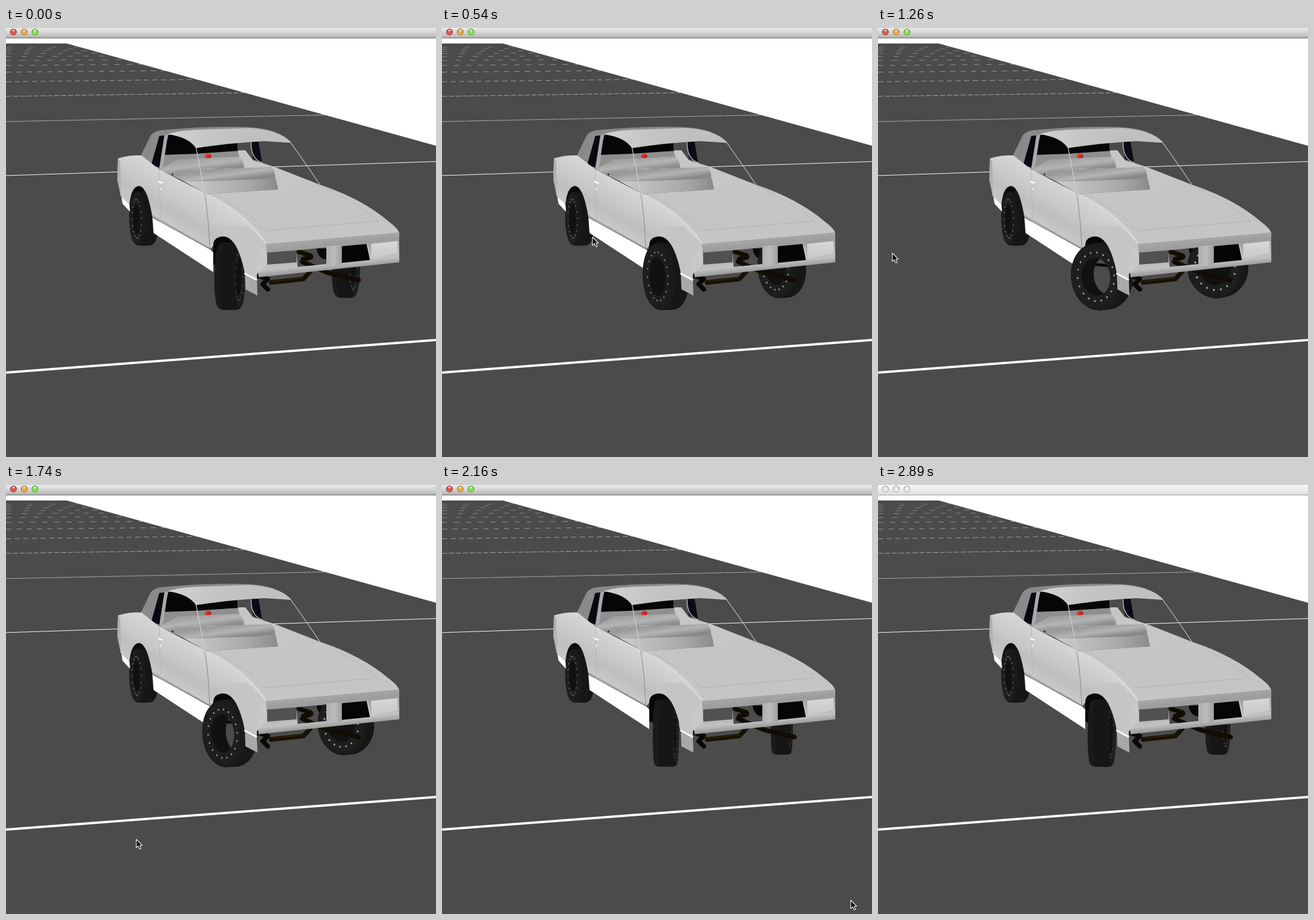
An HTML page with a canvas that plays this animation: 749 px wide and 747 px high, repeating every 2930 ms.

```html
<!DOCTYPE html>
<html lang="en">
<head>
<meta charset="utf-8">
<title>Steering</title>
<style>
html, body { margin: 0; width: 100%; height: 100%; overflow: hidden; background: #fff; }
canvas { display: block; width: 100vw; height: 100vh; }
</style>
</head>
<body>
<canvas id="stage" width="749" height="747"></canvas>
<script>
const ctx = document.getElementById('stage').getContext('2d');
const LOOP = 2930, STEP = 60, BLUR = 2890;
const ENTER = 3, LEAVE = 43;
const GROUND = '#4b4b4b';

// pointer stops: step, x, y
const stops = [
  [ENTER, 714, 336], [9, 262, 364], [11, 173, 368], [16, 25, 392], [21, 25, 392], [23, 0, 420],
  [29, 227, 617], [33, 560, 691], [36, 712, 723], [40, 712, 723], [LEAVE, 715, 750]
];

const rate = (i, c) => (stops[i + 1][c] - stops[i][c]) / (stops[i + 1][0] - stops[i][0]);

// Slope that never overshoots a stop
function slope(i, c) {
  if (i === 0) return rate(0, c);
  if (i === stops.length - 1) return rate(i - 1, c);
  const a = rate(i - 1, c), b = rate(i, c);
  return a * b <= 0 ? 0 : 2 * a * b / (a + b);
}

function pointerAt(step, c) {
  const s = Math.min(Math.max(step, ENTER), LEAVE);
  let i = 0;
  while (s > stops[i + 1][0]) i++;
  const d = stops[i + 1][0] - stops[i][0], k = (s - stops[i][0]) / d, m = 1 - k;
  return m * m * (1 + 2 * k) * stops[i][c] + k * k * (3 - 2 * k) * stops[i + 1][c]
    + d * k * m * (m * slope(i, c) - k * slope(i + 1, c));
}

// The wheels follow the pointer one step late
function steerAt(step) {
  const x = step > ENTER ? pointerAt(step - 1, 1) : 749;
  return 49 - 0.08 * (x - 25);
}

function shape(fill, d) {
  ctx.fillStyle = fill;
  ctx.fill(new Path2D(d), 'evenodd');
}
function line(color, width, d, dash = []) {
  ctx.setLineDash(dash);
  ctx.strokeStyle = color;
  ctx.lineWidth = width;
  ctx.stroke(new Path2D(d));
  ctx.setLineDash([]);
}
function grad(x0, y0, x1, y1, ...colors) {
  const g = ctx.createLinearGradient(x0, y0, x1, y1);
  colors.forEach((c, i) => g.addColorStop(i / (colors.length - 1), c));
  return g;
}
function oval(fill, x, y, rx, ry = rx) {
  ctx.beginPath();
  ctx.ellipse(x, y, rx, ry, 0, 0, 7);
  ctx.fillStyle = fill;
  ctx.fill();
}

function titleBar(active) {
  ctx.fillStyle = active ? grad(0, 0, 0, 17, '#ececec', '#d2d2d2', '#b2b2b2')
                         : grad(0, 0, 0, 17, '#f8f8f8', '#ececec', '#dedede');
  ctx.fillRect(0, 0, 749, 17);
  ctx.fillStyle = active ? '#686868' : '#9a9a9a';
  ctx.fillRect(0, 17, 749, 1);
  [4, 38, 100].forEach((hue, i) => {
    const x = 13 + i * 18.75;
    oval(active ? `hsl(${hue},55%,38%)` : '#9c9c9c', x, 7, 5.8);
    oval(active ? `hsl(${hue},75%,60%)` : '#ececec', x, 7.3, 4.7);
    if (active) oval('rgba(255,255,255,.65)', x, 4.2, 2.6, 1.5);
  });
}

// Evenly spaced floor lines that meet in one far point
function floor() {
  ctx.fillStyle = '#fff';
  ctx.fillRect(0, 18, 749, 729);
  shape(GROUND, 'M0 27 H106 L749 205 V747 H0Z');
  const farX = 7930, farY = -2;
  for (let i = 0; i < 13; i++) {
    const h = 1 / (0.001661 + 0.0022 * i), m = h / farX;
    const x = Math.min(749, (farY + h + 2.3) / (0.2768 + m));
    const dash = i < 2 ? [] : i < 3 ? [40, 1] : [9, 3 + 3 * (i - 3)];
    line(`rgba(255,255,255,${i < 2 ? 1 : 0.6 - 0.03 * i})`, Math.max(1, 4 * (h / 602) ** 1.5),
      `M0 ${farY + h} L${x} ${farY + h - m * x}`, dash);
  }
}

// A tyre built from discs along its axle; deg turns its face towards the viewer
function wheel(cx, cy, R, W, deg, open) {
  const a = deg * Math.PI / 180, s = Math.sin(a), c = Math.cos(a), tilt = .1;
  const side = s >= 0 ? 1 : -1, rim = .85 * side;
  const spot = (w, r, q) => [
    cx - W * w * c + Math.cos(q) * s * r,
    cy + W * w * s * tilt + Math.cos(q) * c * tilt * r - Math.sin(q) * r
  ];
  const ring = (w, r) => {
    ctx.beginPath();
    for (let q = 0; q < 6.28; q += .1) ctx.lineTo(...spot(w, r, q));
    ctx.closePath();
  };
  const N = 40;
  ctx.lineWidth = 1;
  for (let i = 0; i <= N; i++) {
    const w = side * (i / N * 2 - 1);
    const edge = Math.max(0, (Math.abs(w) - .5) / .5);
    ring(w, R * (1 - .06 * edge ** 3));
    ctx.fillStyle = ctx.strokeStyle = w > .5 ? '#1b1b1b' : '#171717';
    ctx.fill();
    ctx.stroke();
  }
  ring(side, R * .93);
  ctx.fillStyle = '#1e1e1e';
  ctx.fill();
  ctx.save();
  ring(rim, R * .57);
  ctx.fillStyle = '#111';
  ctx.fill();
  ctx.clip();
  if (open) {
    ring(-rim, R * .57);
    ctx.clip();
    ctx.fillStyle = GROUND;
    ctx.fill();
    line('#0c0a06', 5, `M${cx - 20} ${cy - 21} l32 3`);
  }
  ctx.restore();
  const glow = Math.min(.85, .35 + Math.abs(s));
  for (let i = 0; i < 18; i++) {
    oval(`rgba(180,180,180,${glow})`, ...spot(rim, R * .73, i * Math.PI / 9 + .12),
      .5 + 1.4 * Math.abs(s), 1 + .9 * Math.abs(s));
  }
}

function pipes() {
  ctx.lineJoin = ctx.lineCap = 'round';
  line('#0b0905', 8, 'M438 431 L456 437 L447 446 L456 455');
  line('#171105', 8, 'M462 443 L518 437 L530 424');
  line('#2a2008', 2, 'M464 441 L517 435');
  line('#120d04', 8, 'M508 389 L530 396 Q536 400 518 402 L516 407 L560 426 L614 439');
  ctx.lineCap = 'butt';
  ctx.lineJoin = 'miter';
}

function cabin() {
  shape('#c6c6c6', 'M400 224 L405 213 L417 213 L430 230 L468 242 L547 273 L474 282 L415 246Z');
  shape('#8f8f8f', 'M272 221 L403 214 L407 225 L300 236 L269 244Z');
  shape('#060608', 'M281 185 Q315 187 331 209 L403 200 V214 L331 219 L273 221Z');
  shape('#0a0b14', 'M427 198 H440 L446 235 L430 227Z');
  line('#b5b5b5', 1.5, 'M427 199 Q426 228 447 235');
  oval(grad(348, 219, 356, 228, '#f2453a', '#b5100c'), 352, 223, 5.8, 4.3);
  // benches
  shape('#a2a2a2', 'M269 245 L300 229 L345 286Z');
  shape(grad(350, 226, 353, 248, '#a2a2a2', '#b4b4b4', '#8c8c8c'),
    'M268 247 L299 229 L404 224 Q414 228 415 244 L330 246 L284 255Z');
  shape(grad(390, 244, 393, 266, '#9a9a9a', '#b4b4b4', '#888'),
    'M284 255 L300 248 L462 242 Q469 248 469 262 L345 268 L312 267Z');
  shape(grad(320, 0, 474, 0, '#c8c8c8', '#b8b8b8', '#a8a8a8', '#8a8a8a'),
    'M310 267 H345 L470 262 L474 281 L349 289Z');
  // roof and pillars
  shape('#8a8a8a', 'M234 224 L252 187 Q257 180 270 178 Q340 171 400 172 Q450 172 470 182 L283 186 L267 246 L252 241Z');
  shape(grad(300, 176, 420, 205, '#d0d0d0', '#c5c5c5', '#c0c0c0'),
    'M282 185 Q300 178 340 177 L425 174 Q480 178 497 200 L450 197 Q390 200 331 209 Q318 190 282 185Z');
  shape('#080911', 'M267 188 L276 187 L267 243 L253 238Z');
  shape('#a9a9a9', 'M276 187 L282 185 L273 247 L267 246Z');
  line('#c6c6c6', 1.2, 'M494 197 Q520 233 547 273');
  line('#d0d0d0', 1.3, 'M331 208 L346 287');
}

function shell() {
  shape(grad(300, 255, 260, 327, '#d8d8d8', '#d0d0d0', '#c8c8c8', '#bebebe', '#c8c8c8'),
    `M195 227 Q215 221 236 222 L268 247 L349 289 Q410 314 453 376 L437 430 L414 425
     C408 385 394 362 378 363 Q361 364 361 379 L356 385 L255 329
     C250 300 243 275 231 275 Q218 277 215 307 L200 293 L194 264Z`);
  shape('#b0b0b0', 'M195 227 L199 232 L200 292 L194 264Z');
  shape('#fff', 'M201 294 L215 307 L216 320 L203 306Z');
  shape('#fff', 'M255 330 L356 386 L361 391 V425 L257 357Z');
  line('#818181', 1, 'M254 326 L356 384');
  line('#a0a0a0', 1, 'M267 248 L269 330', [2, 2]);
  line('#858585', 1, 'M346 287 Q353 330 355 384');
  line('#e0e0e0', 1.3, 'M268 248 L349 290');
  line('#fff', 2.5, 'M265 267 L273 270');
  oval('#fff', 269, 280, 1.5);
  oval('#333', 290, 255, 1.8);
}

function fender() {
  shape('#c5c5c5', 'M378 345 L420 345 L453 376 L437 412 V439 L416 427 C408 385 394 362 378 363Z');
  shape('#a9a9a9', 'M416 427 L437 439 L438 466 L417 455Z');
  line('#fff', 3, 'M415 427 L437 439');
}

function nose() {
  shape('#c5c5c5', 'M349 289 L475 281 L547 273 Q620 297 668 338 Q684 350 685 358 L453 377 Q412 317 349 289Z');
  line('#d8d8d8', 3, 'M351 291 Q411 317 453 375');
  line('#a0a0a0', 1, 'M362 289 L430 330 L450 353 L648 336 Q610 305 553 277', [2, 2]);
  // the grille is cut right through
  shape(grad(560, 364, 566, 425, '#a9a9a9', '#9c9c9c', '#b0b0b0', '#c2c2c2', '#8c8c8c'),
    `M453 376 L685 356 V408 L535 424 L440 434 L437 412Z
     M506 387 L558 382 V411 L508 416Z`);
  shape('#c8c8c8', 'M453 376 L455 412 L437 428 V400Z');
  shape('#515151', 'M455 391 L506 387 V408 L455 412Z');
  shape(grad(558, 0, 585, 0, '#b0b0b0', '#bcbcbc', '#9f9f9f'), 'M558 380 L585 378 V412 L558 414Z');
  shape('#050505', 'M585 380 L628 376 L634 404 L585 409Z');
  line('#d8d8d8', 1, 'M629 376 L635 404');
  shape(grad(0, 373, 0, 402, '#d6d6d6', '#c8c8c8'), 'M636 376 L682 371 V392 L637 402Z');
}

function pointer(x, y) {
  ctx.save();
  ctx.translate(x, y);
  ctx.lineJoin = 'round';
  const arrow = 'M0 0 V14.5 L3.4 11.4 L6 17 L8.4 16 L6 10.5 H10.3Z';
  shape('#000', arrow);
  line('#fff', 1.1, arrow);
  ctx.restore();
}

function draw(t) {
  const step = Math.floor(t / STEP), turn = steerAt(step);
  floor();
  titleBar(t < BLUR);
  shape('#090909', 'M541 384 H558 V403 Q544 402 541 384Z');
  wheel(592, 417, 52, 16, turn * 1.35 + 2, false);
  pipes();
  shape('#0b0b0b', 'M215 310 Q218 275 231 274 Q246 276 256 335 H235Z');
  wheel(240, 332, 46, 15, 14, false);
  cabin();
  shell();
  shape('#080808', 'M361 412 V379 Q361 364 378 363 C394 362 408 385 414 425Z');
  wheel(390, 432, 58, 18.6, turn, true);
  fender();
  nose();
  if (step >= ENTER && step < LEAVE) pointer(pointerAt(step, 1), pointerAt(step, 2));
}

let start = null;
function tick(now) {
  if (start === null) start = now;
  draw((now - start) % LOOP);
  requestAnimationFrame(tick);
}
draw(0);
requestAnimationFrame(tick);
</script>
</body>
</html>
```
